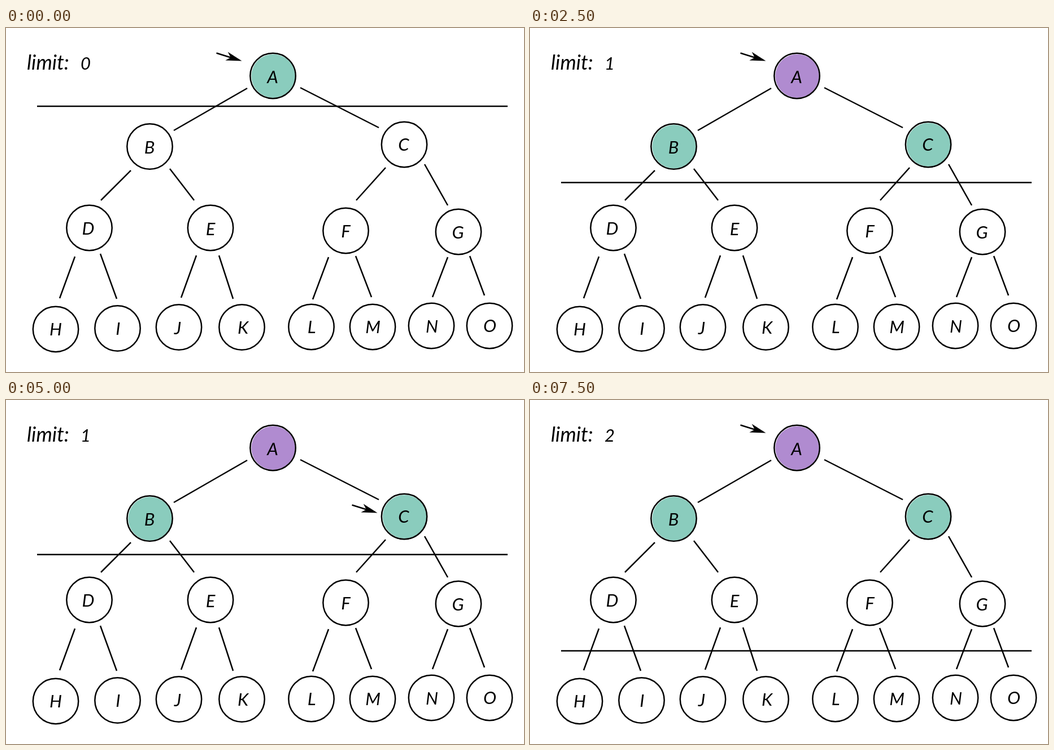
Write an HTML page that moves like this. It is 917 by 611 pixels and loops after 8000 ms.

```html
<!DOCTYPE html>
<html lang="en">
<head>
<meta charset="utf-8">
<title>Iterative deepening</title>
<style>
  html, body { margin: 0; width: 100%; height: 100%; overflow: hidden; background: #fff; }
  svg { display: block; width: 917px; height: 611px; }
  text { font: italic 400 31px Lato, "Open Sans", sans-serif; fill: #000; }
  .name { text-anchor: middle; }
  .line { stroke: #000; stroke-width: 2.5; fill: none; }
</style>
</head>
<body>
<svg id="stage" viewBox="0 0 917 611"></svg>
<script>
const LOOP = 8000;
const TEAL = '#8accbd', PURPLE = '#b08bd0', NONE = '#fff';
const stage = document.getElementById('stage');

// name: circle centre, letter centre
const nodes = {
  A: [472.5, 85, 472, 87], B: [254.5, 210.5, 254, 212], C: [705, 207, 704, 207],
  D: [147.5, 355, 145.5, 356], E: [362, 355, 362, 357], F: [601.5, 360, 601.5, 361],
  G: [801, 362, 800, 363], H: [88, 535, 88, 535], I: [197.5, 533.5, 198.5, 534],
  J: [306, 531.5, 304, 533], K: [417.5, 531.5, 419.5, 532], L: [540.5, 531, 541, 531],
  M: [649, 531, 649.5, 531], N: [753, 529, 754, 530], O: [856, 529, 856.5, 529]
};

const edges = [
  [427, 107, 297, 182], [521, 106, 660, 177],
  [221, 253, 168, 306], [290, 250, 333, 306], [672, 248, 620, 306], [741, 242, 782, 315],
  [122, 406, 95, 480], [167, 401, 196, 481], [337, 404, 310, 479], [377, 404, 402, 481],
  [571, 407, 543, 482], [619, 405, 647, 478], [782, 407, 755, 478], [821, 405, 847, 475]
];

const limitY = [139, 274.5, 445.5];
const arrowShift = { A: [0, 0], B: [-207, 118], C: [240, 142] };

// start time, depth limit, node under the arrow, root expanded
const steps = [
  [0, 0, 'A', false],
  [1250, 1, 'A', false],
  [2500, 1, 'A', true],
  [3750, 1, 'B', true],
  [5000, 1, 'C', true],
  [6250, 2, 'A', false],
  [7500, 2, 'A', true]
];

function add(tag, attrs, text = '', parent = stage) {
  const el = document.createElementNS('http://www.w3.org/2000/svg', tag);
  for (const key in attrs) el.setAttribute(key, attrs[key]);
  el.textContent = text;
  return parent.appendChild(el);
}

const fills = {};
for (const [name, [cx, cy, tx, ty]] of Object.entries(nodes)) {
  fills[name] = add('circle', { cx: cx + 0.5, cy: cy + 0.2, r: 38.7, fill: NONE });
  add('circle', { cx, cy, r: 40.2, class: 'line' });
  add('text', { x: tx, y: ty + 11, class: 'name' }, name);
}
for (const [x1, y1, x2, y2] of edges) add('line', { x1, y1, x2, y2, class: 'line' });

const limitLine = add('line', { x1: 55, x2: 888, class: 'line' });
add('text', { x: 37, y: 73.5, style: 'font-size: 36px' }, 'limit:');
const limitText = add('text', { x: 132, y: 73.5 });

const arrow = add('g', {});
add('path', { d: 'M372.5 44.5 L398 52.5', class: 'line' }, '', arrow);
add('path', { d: 'M417.5 58.5 L392.7 42.6 L397.8 52.4 L388.3 57.4 Z' }, '', arrow);

let shown;
function show(step) {
  if (step === shown) return;
  shown = step;
  const [, limit, current, expanded] = step;
  limitText.textContent = limit;
  limitLine.setAttribute('y1', limitY[limit]);
  limitLine.setAttribute('y2', limitY[limit]);
  arrow.setAttribute('transform', `translate(${arrowShift[current]})`);
  fills.A.setAttribute('fill', expanded ? PURPLE : TEAL);
  for (const child of 'BC') fills[child].setAttribute('fill', expanded ? TEAL : NONE);
}

const start = performance.now();
function tick() {
  const t = (performance.now() - start) % LOOP;
  show(steps.findLast(([from]) => from <= t));
  requestAnimationFrame(tick);
}
tick();
</script>
</body>
</html>
```
